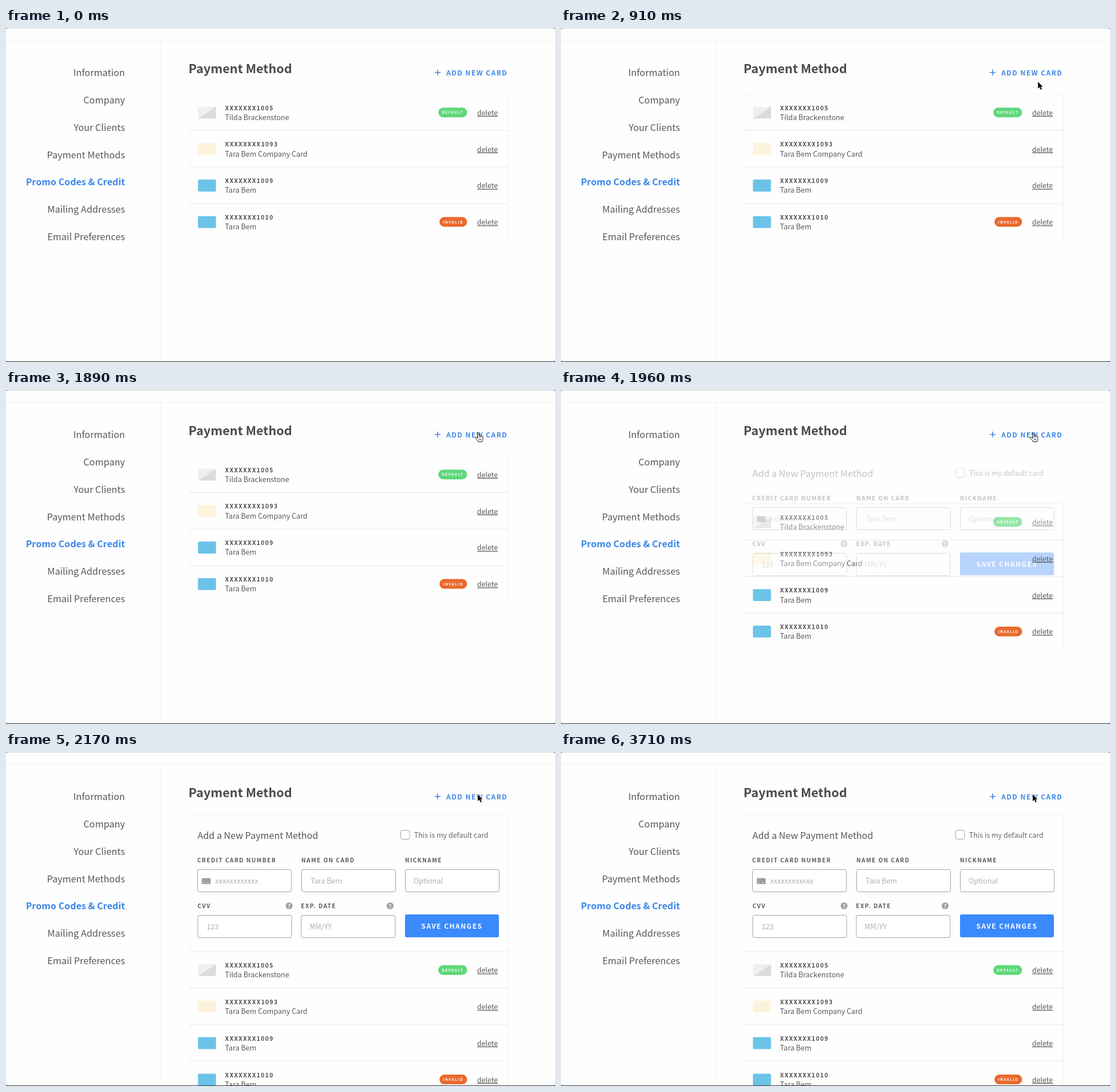
Animation, 959 px wide and 584 px high, one loop 3.78 s. Source, as an HTML page:

```html
<!DOCTYPE html>
<html lang="en">
<head>
<meta charset="utf-8">
<title>Payment Method</title>
<style>
  html, body { margin: 0; width: 100%; height: 100%; overflow: hidden; background: #333; }
  svg { display: block; font-family: "Noto Sans CJK JP", "Noto Sans CJK SC", "Noto Sans CJK", "Open Sans", sans-serif; }
</style>
</head>
<body>
<svg id="stage" width="959" height="584" viewBox="0 0 959 584"></svg>
<script>
const LOOP = 3780, STEP = 70;
const DARK = '#4a4a4a', MID = '#585858', BLUE = '#3a86e8', LINE = '#ebebeb';

const text = (x, y, str, size, fill, extra = '') =>
  `<text x="${x}" y="${y}" font-size="${size}" fill="${fill}" ${extra}>${str}</text>`;
const bold = (x, y, str, size, fill, spacing = 0, extra = '') =>
  text(x, y, str, size, fill, `font-weight="700" letter-spacing="${spacing}" ${extra}`);
const rect = (x, y, w, h, r, fill, extra = '') =>
  `<rect x="${x}" y="${y}" width="${w}" height="${h}" rx="${r}" fill="${fill}" ${extra}/>`;
const path = (d, stroke, extra = 'fill="none"') => `<path d="${d}" stroke="${stroke}" ${extra}/>`;

// Page frame, menu and heading
const menu = ['Information', 'Company', 'Your Clients', 'Payment Methods',
  'Promo Codes &amp; Credit', 'Mailing Addresses', 'Email Preferences'];

const page = rect(0, 0, 959, 583, 3, '#d8d8d8') + rect(0, 1, 959, 582, 3, '#fefefe') +
  path('M0 21.5H959M270.5 22V583', '#f0f0f0') +
  menu.map((label, i) => {
    const y = 84 + i * 47.85;
    return i === 4
      ? bold(207.8, y, label, 16.1, BLUE, 0, 'text-anchor="end"')
      : text(207.8, y, label, 16.25, MID, 'text-anchor="end"');
  }).join('') +
  bold(318.8, 79, 'Payment Method', 21.6, DARK) +
  path('M749 77.8h10M754 72.8v10', BLUE, 'stroke-width="1.6"') +
  bold(769.2, 82.9, 'ADD NEW CARD', 11.9, BLUE, 1.5);

// Saved cards
const badge = (x, label, fill) =>
  rect(x, 24.2, 805.4 - x, 17, 8.5, fill) + bold(x + 6.2, 35.2, label, 6.4, '#fff', 1.5);
const cards = [
  ['XXXXXXX1005', 'Tilda Brackenstone', '#efefef', badge(755.2, 'DEFAULT', '#5fd87a')],
  ['XXXXXXXX1093', 'Tara Bem Company Card', '#fdf3dc', ''],
  ['XXXXXXX1009', 'Tara Bem', '#6cc3e8', ''],
  ['XXXXXXX1010', 'Tara Bem', '#6cc3e8', badge(757.2, 'INVALID', '#ea6a2d')],
];
const rows = cards.map(([number, name, color, tag], i) =>
  `<g transform="translate(0 ${115 + i * 63.8})">` +
  path('M319 .5H878', i ? LINE : '#f3f3f3', 'stroke-width="1.4"') +
  path('M319.5 0V63', '#f7f7f7') + path('M877.5 0V63', '#f0f0f0') +
  rect(335.3, 22.5, 31.5, 20.8, 2, color) +
  (i ? '' : '<path d="M336 43.3L366.8 22.7V43.3Z" fill="#dcdcdc"/>') +
  bold(382.8, 28.7, number, 10.3, DARK, 1.4) +
  text(382.6, 45.9, name, 12.55, MID) + tag +
  text(823, 37.8, 'delete', 12.4, MID, 'text-decoration="underline"') + '</g>').join('');

// New card form: the list slides between its base and its fields
const formBase = path('M319 109.5H878', '#f2f2f2') + path('M319 349H878', LINE) +
  path('M319.5 109V349', '#f7f7f7') + path('M877.5 109V349', '#f0f0f0') +
  text(334.6, 151.6, 'Add a New Payment Method', 16.1, MID) +
  rect(689.5, 137, 15.5, 15.5, 3, '#fff', 'stroke="#a0a0a0"') +
  text(712.8, 149.7, 'This is my default card', 12.5, '#666') +
  rect(697, 284, 164, 40, 3, '#3a8afd') +
  bold(725.6, 309, 'SAVE CHANGES', 11.9, '#fff', 1.5);

const field = (x, y, label, hint, indent = 16) =>
  bold(x, y - 12.1, label, 10.1, MID, 1.45) +
  rect(x + .5, y + .5, 164, 39, 3, '#fff', 'stroke="#a2a2a2"') +
  text(x + indent, y + 25.2, hint, 12.6, '#b0b0b0');
const help = x => `<circle cx="${x}" cy="269" r="6" fill="#a0a0a0"/>` +
  bold(x, 272.6, '?', 9.5, '#fff', 0, 'text-anchor="middle"');
const formFields = field(334, 205, 'CREDIT CARD NUMBER', 'xxxxxxxxxxxx', 31.5) +
  rect(342, 220.5, 15.5, 10.5, 1.5, '#a0a0a0') + path('M344 228.5h3M351 228.5h4', '#e4e4e4') +
  field(516, 205, 'NAME ON CARD', 'Tara Bem') + field(697, 205, 'NICKNAME', 'Optional', 15) +
  field(334.5, 285, 'CVV', '123') + field(515.3, 285, 'EXP. DATE', 'MM/YY', 15) +
  help(494.5) + help(671);

// Cursors, both with their hot spot at 0,0
const arrow = path('M0 0V12L2.8 9.5L4.8 14L6.9 13.1L5 8.8H8.6Z', '#fff',
  'fill="#111" paint-order="stroke" stroke-width="1.6"');
const hand = path('M-1 1Q0-.8 1.2 1L2.6 6Q4 4.8 5 6Q6.4 5.2 7.2 6.6Q8.8 6.2 9 8' +
  'L9 12Q8.6 14 7.6 16.5H.8Q-1.4 12.5-4.6 9.6Q-4.4 7.6-2.2 8.8L.6 10.4Z' +
  'M3 6.5L3.6 9M5.4 6.6L5.8 9M3 11.5V14M5 11.5V14', '#111', 'fill="#fff" stroke-linejoin="round"');

document.getElementById('stage').innerHTML = page +
  `<g id="base">${formBase}</g><g id="list">${rows}</g><g id="fields">${formFields}</g>` +
  `<g id="cursor"><g id="arrow">${arrow}</g><g id="hand">${hand}</g></g>` +
  rect(0, 583, 959, 1, 0, '#333');

const [base, list, fields, cursor, arrowShape, handShape] =
  ['base', 'list', 'fields', 'cursor', 'arrow', 'hand'].map(id => document.getElementById(id));
const easeOut = (t, start, duration, power) =>
  1 - (1 - Math.min(1, Math.max(0, (t - start) / duration))) ** power;
const show = (el, on) => el.setAttribute('visibility', on ? 'visible' : 'hidden');

function draw(now) {
  const t = Math.floor(now % LOOP / STEP) * STEP;

  const open = easeOut(t, 1890, 280, 1.53);
  list.setAttribute('transform', `translate(0 ${233.5 * open})`);
  base.setAttribute('opacity', open);
  fields.setAttribute('opacity', open);

  const x = 913 - 89 * easeOut(t, 280, 830, 1.6);
  const y = 418 - 344 * easeOut(t, 280, 830, 2);
  const hovering = t >= 980 && t < 2100;
  cursor.setAttribute('transform', `translate(${x} ${y})`);
  show(arrowShape, t >= 280 && !hovering);
  show(handShape, hovering);

  requestAnimationFrame(draw);
}
draw(0);
</script>
</body>
</html>
```
